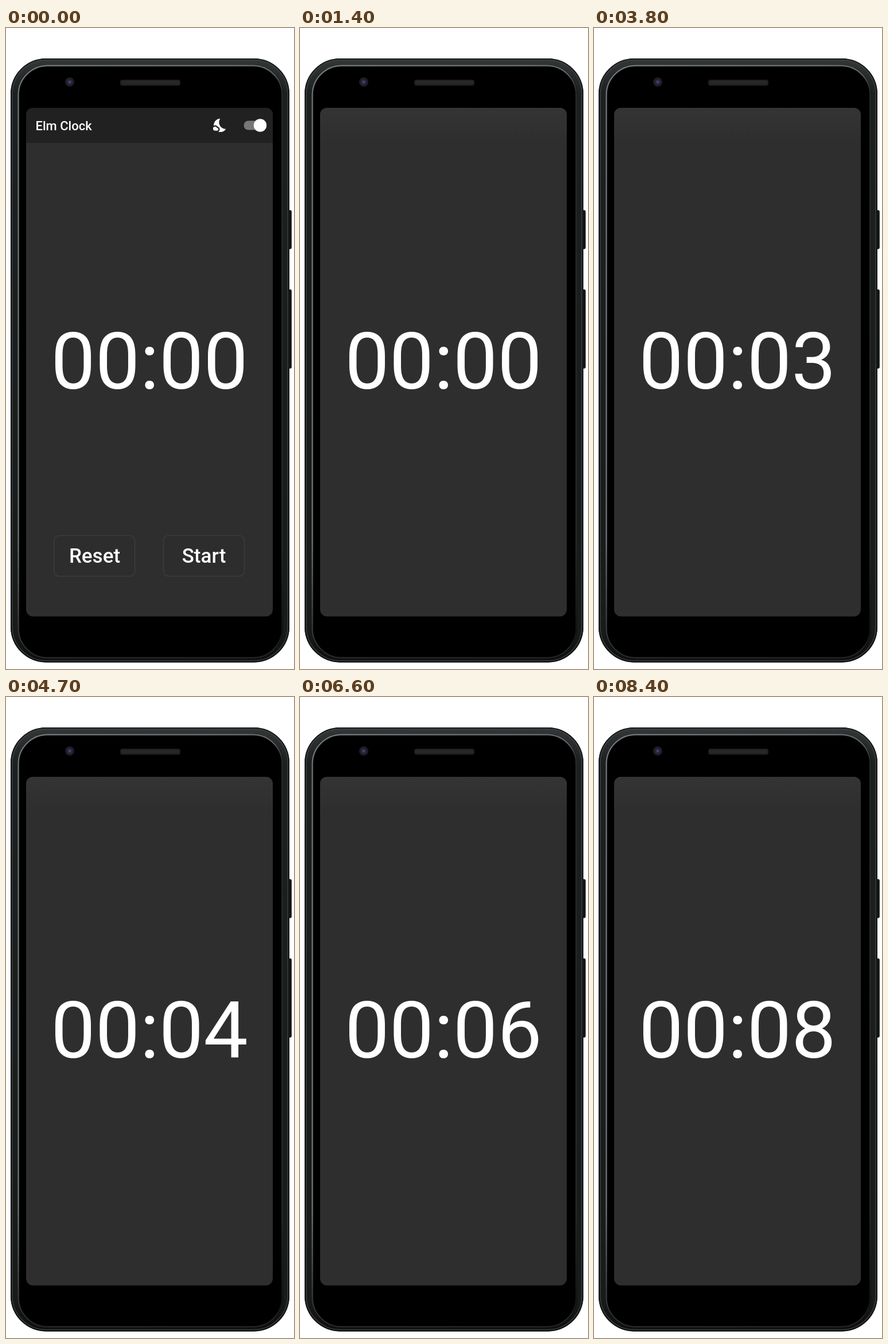
Recreate the animation shown at these times as an HTML page. Size 502x1116 px, loop 8800 ms.

```html
<!DOCTYPE html>
<html lang="en">
<head>
<meta charset="utf-8">
<title>Elm Clock</title>
<style>
  html, body { margin: 0; width: 100%; height: 100%; overflow: hidden; background: #fff; }
  svg { display: block; width: 100vw; height: 100vh; }
  text { font-family: Roboto, "Open Sans", sans-serif; fill: #fff; white-space: pre; }
  .title { font-size: 22px; font-weight: 500; }
  .label { font-size: 35px; font-weight: 500; text-anchor: middle; }
  .time { font-size: 138px; }
  .btn { fill: #2d2d2d; stroke: #3c3c3c; stroke-width: 1.6; }
  .ring { fill: none; }

  /* Every change is a hard cut on one shared 8.8 s loop. */
  .digits, .controls, .zen, .start, .stop, .press {
    animation: 8.8s step-end infinite;
  }
  .digits { animation-name: count; }
  .controls { animation-name: leave; }
  .zen { animation-name: enter; }
  .start { animation-name: start; }
  .stop { animation-name: stop; }
  .press { animation-name: press; }

  @keyframes count {
    0% { transform: translateY(0); }
    23.86% { transform: translateY(-200px); }
    32.95% { transform: translateY(-400px); }
    43.18% { transform: translateY(-600px); }
    53.4% { transform: translateY(-800px); }
    64.77% { transform: translateY(-1000px); }
    74.99% { transform: translateY(-1200px); }
    85.22% { transform: translateY(-1400px); }
    95.45%, 100% { transform: translateY(-1600px); }
  }
  @keyframes leave { 0% { opacity: 1; } 15.9%, 100% { opacity: 0; } }
  @keyframes enter { 0% { opacity: 0; } 15.9%, 100% { opacity: 1; } }
  @keyframes start { 0% { opacity: 1; } 9.09%, 100% { opacity: 0; } }
  @keyframes stop { 0% { opacity: 0; } 9.09%, 100% { opacity: 1; } }
  @keyframes press {
    0% { fill: #2d2d2d; }
    7.95% { fill: #363636; }
    9.09% { fill: #323232; }
    10.22%, 100% { fill: #2d2d2d; }
  }
</style>
</head>
<body>
<svg viewBox="0 0 502 1116" preserveAspectRatio="none">
  <defs>
    <linearGradient id="rim" x1="0" x2="0" y1="0" y2="1">
      <stop offset="0" stop-color="#343737"/>
      <stop offset=".06" stop-color="#1d2020"/>
      <stop offset=".95" stop-color="#191b1b"/>
      <stop offset="1" stop-color="#0c0d0d"/>
    </linearGradient>
    <linearGradient id="edge" x1="0" x2="1" y1="0" y2="0">
      <stop offset="0" stop-color="#6e7474"/>
      <stop offset=".12" stop-color="#747a7a"/>
      <stop offset=".85" stop-color="#6a7070"/>
      <stop offset=".97" stop-color="#5c6161"/>
      <stop offset="1" stop-color="#2a2d2d"/>
    </linearGradient>
    <linearGradient id="fade" x1="0" x2="0" y1="0" y2="1">
      <stop offset="0" stop-color="#fff"/>
      <stop offset=".8" stop-color="#fff"/>
      <stop offset="1" stop-color="#444"/>
    </linearGradient>
    <linearGradient id="glow" x1="0" x2="0" y1="0" y2="1">
      <stop offset="0" stop-color="#343434"/>
      <stop offset="1" stop-color="#2e2e2e"/>
    </linearGradient>
    <mask id="dim" maskUnits="userSpaceOnUse" x="0" y="0" width="502" height="1116">
      <rect width="502" height="1116" fill="url(#fade)"/>
    </mask>
    <clipPath id="screen"><rect x="35" y="139" width="430" height="885.5" rx="12"/></clipPath>
    <clipPath id="slot"><rect x="340" y="510" width="90" height="140"/></clipPath>
  </defs>

  <rect width="502" height="1116" fill="#fff"/>

  <!-- phone -->
  <g fill="#151717" stroke="#2e3131">
    <rect x="491" y="317.5" width="6.5" height="67" rx="2"/>
    <rect x="491" y="455.5" width="6.5" height="137" rx="2"/>
  </g>
  <rect x="8" y="53" width="486" height="1051.5" rx="62" fill="url(#rim)"/>
  <rect class="ring" x="8.7" y="53.7" width="484.6" height="1050" rx="61" stroke="#101212" stroke-width="1.4"/>
  <rect class="ring" x="11" y="56" width="480" height="1045.5" rx="59" stroke="#3b3f3f" stroke-width="1.3"/>
  <rect x="20" y="64" width="463" height="1034" rx="52" fill="#000"/>
  <rect class="ring" x="21.5" y="65.5" width="460" height="1031" rx="51" stroke="url(#edge)" stroke-width="2.4" mask="url(#dim)"/>
  <rect x="23.5" y="67.5" width="456.5" height="1027" rx="49" fill="#000"/>

  <rect x="199" y="90" width="105" height="10.5" rx="4" fill="#1f1f1f"/>
  <rect x="201" y="92" width="101" height="6" rx="3" fill="#272727"/>
  <circle cx="111" cy="94" r="8" fill="#1d1d25"/>
  <circle cx="111" cy="94" r="4.6" fill="#2a2a45"/>
  <circle cx="111" cy="94" r="2" fill="#484878"/>

  <!-- screen -->
  <g clip-path="url(#screen)">
    <rect x="35" y="139" width="430" height="886" fill="#2e2e2e"/>
    <rect class="zen" x="35" y="139" width="430" height="61" fill="url(#glow)"/>

    <g class="controls">
      <rect x="35" y="139" width="430" height="61" fill="#212121"/>
      <text class="title" x="51.5" y="177.5">Elm Clock</text>
      <path transform="translate(359.8 155.5) scale(1.16)" fill="#fff"
        d="M11.6 2C10.6 3.6 8.8 7.6 11.1 12.1S18 17.7 20.4 17.5A10 10 0 0 1 8.9 21.5A4 4 0 0 0 8.1 14.15A5 5 0 0 0 2 12.4A10 10 0 0 1 11.6 2ZM7 16A2 2 0 0 1 7 20H4A3 3 0 1 1 6.8 16Z"/>
      <rect x="414.5" y="161.5" width="38" height="16" rx="8" fill="#777"/>
      <circle cx="443" cy="169.5" r="11.2" fill="#fff"/>

      <rect class="btn" x="84" y="883.5" width="140.5" height="71" rx="9"/>
      <text class="label" x="154.5" y="931">Reset</text>
      <rect class="btn press" x="274.5" y="883.5" width="141" height="71" rx="9"/>
      <text class="label start" x="345" y="931">Start</text>
      <text class="label stop" x="344.7" y="931">Stop</text>
    </g>

    <text class="time" x="78.3" y="628">00:0</text>
    <g clip-path="url(#slot)">
      <text class="time digits" y="628"><tspan x="344.2">0</tspan><tspan x="344.2" dy="200">1</tspan><tspan x="344.2" dy="200">2</tspan><tspan x="344.2" dy="200">3</tspan><tspan x="344.2" dy="200">4</tspan><tspan x="344.2" dy="200">5</tspan><tspan x="344.2" dy="200">6</tspan><tspan x="344.2" dy="200">7</tspan><tspan x="344.2" dy="200">8</tspan></text>
    </g>
  </g>
</svg>
</body>
</html>
```
